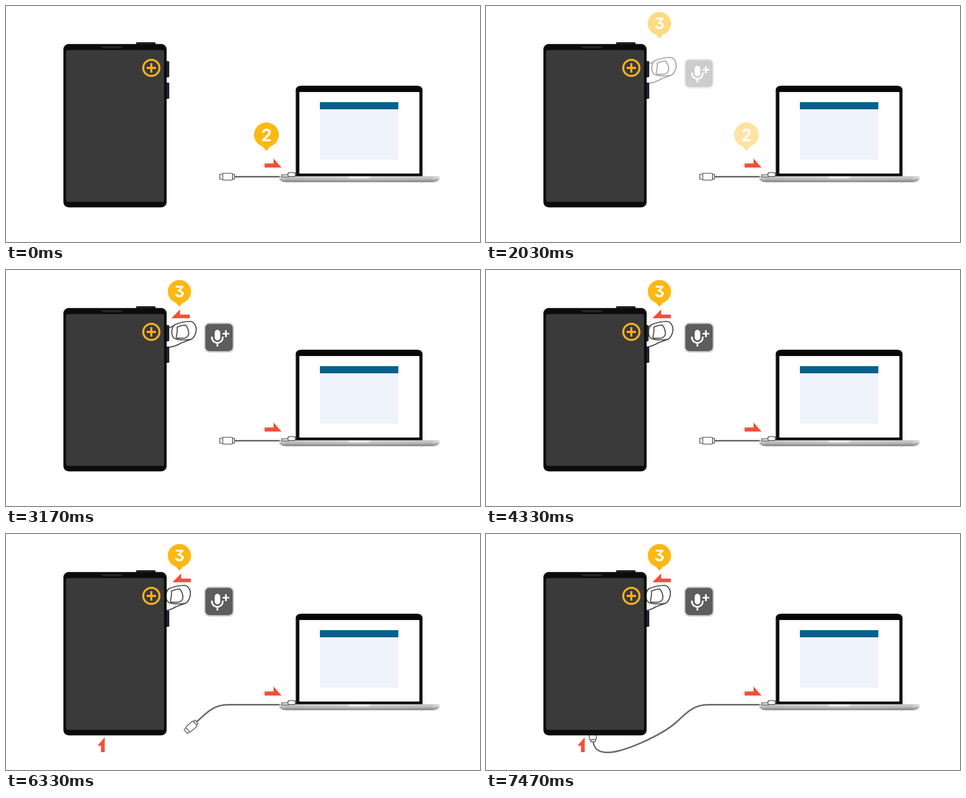
Animation of 900 by 450 pixels, one loop 9100 ms. Source, as an HTML page:

```html
<!DOCTYPE html>
<html lang="en">
<head>
<meta charset="utf-8">
<title>Connect and press</title>
<style>
  html, body { margin: 0; width: 100%; height: 100%; overflow: hidden; background: #fff; }
  svg { display: block; width: 100vw; height: 100vh; filter: blur(.5px); }
  text { font: 700 32px Inter, "Open Sans", sans-serif; font-feature-settings: "cv09"; fill: #fff; text-anchor: middle; }
  .red { fill: #f4503a; }
  .button { fill: #22222d; }
  .line { fill: none; stroke: #505050; stroke-width: 2.1; stroke-linecap: round; stroke-linejoin: round; }
  .plug { fill: #fff; stroke: #686868; stroke-width: 1.7; }
  .gold { fill: none; stroke: #fdb022; stroke-width: 3.8; }
  .mic { fill: none; stroke: #fff; stroke-width: 3.2; }
</style>
</head>
<body>
<svg viewBox="0 0 900 450">
  <defs>
    <linearGradient id="silver">
      <stop offset="0" stop-color="#d2d0d2"/>
      <stop offset=".06" stop-color="#c6c3c6"/>
      <stop offset=".5" stop-color="#d4d1d4"/>
      <stop offset=".94" stop-color="#c6c3c6"/>
      <stop offset="1" stop-color="#dddbdd"/>
    </linearGradient>
    <linearGradient id="shade" x2="0" y2="1">
      <stop offset=".3" stop-color="#555" stop-opacity="0"/>
      <stop offset="1" stop-color="#555" stop-opacity=".6"/>
    </linearGradient>
    <path id="pin" fill="#fdb813" d="M-7 21.5A23.5 23.5 0 1 1 7 21.5L1.5 28.5Q0 30-1.5 28.5Z"/>
    <path id="base" d="M519 324.500H823V331Q819 336 808 336H534Q523 336 519 331Z"/>
  </defs>

  <!-- cable -->
  <path id="cable" fill="none" stroke="#6c6c6c" stroke-width="3"
    d="M524 325.500H422C392 325.500 380 342.500 360 360C333 383.500 262 416.500 231 416.500C213 416.500 204.500 408 203.700 396"/>
  <g id="plug" class="plug">
    <rect x="22" y="-5" width="6" height="10" rx="1"/>
    <rect x="4" y="-6.500" width="18.500" height="13" rx="1.5"/>
    <rect x="0" y="-4.300" width="4" height="8.600"/>
  </g>

  <!-- hand -->
  <g id="hand" class="line">
    <path d="M308 110Q316 109 321 104Q336 98 350 98C358 99 362 108 361 116Q359 128 352 132L333 139Q322 146 308 147.500"/>
    <path d="M321 104C314 109 313 122 318 129C323 134 341 134 352 132"/>
    <path d="M325 109Q333 105 341 105Q347 112 347 122Q345 129 338 130H325Q322 129 324 124Q326 116 325 109Z"/>
  </g>

  <!-- tablet -->
  <g class="button">
    <rect id="key" x="300" y="105" width="10" height="31" rx="2"/>
    <rect x="300" y="146" width="10" height="31" rx="2"/>
    <rect x="247" y="69" width="37" height="9" rx="2"/>
  </g>
  <rect x="109" y="72.500" width="196" height="311.500" rx="10" fill="#0c0c0c"/>
  <rect x="114" y="84" width="186" height="289.500" rx="4" fill="#3a3a3a"/>
  <rect x="182" y="77" width="38.500" height="3.500" rx="1.7" fill="#262633"/>
  <circle class="gold" cx="276" cy="118" r="15.4"/>
  <path class="gold" d="M267 118H285M276 109V127"/>

  <!-- laptop -->
  <path d="M550 325V162Q550 152 560 152H781Q791 152 791 162V325Z" fill="#080808"/>
  <path d="M551 324V163M790 324V163" stroke="#555" stroke-width="1"/>
  <rect x="557" y="164" width="228" height="155.500" fill="#fff"/>
  <rect x="596" y="183.300" width="149" height="109.700" fill="#eff3fc"/>
  <rect x="596" y="183.300" width="149" height="13.700" fill="#03618c"/>
  <use href="#base" fill="url(#silver)"/>
  <use href="#base" fill="url(#shade)"/>
  <path d="M649 325H691Q690 329 686 329H654Q650 329 649 325Z" fill="#e9e9eb"/>
  <g class="plug">
    <rect x="524" y="322" width="12" height="4"/>
    <rect x="535.500" y="317.700" width="13.500" height="7.500" rx="1"/>
  </g>

  <!-- microphone tile -->
  <g id="tile">
    <rect x="376" y="100" width="57" height="57.500" rx="10" fill="#d0d0d0"/>
    <rect x="378.500" y="102.700" width="52" height="52" rx="8" fill="#5d5d5d"/>
    <rect x="396.300" y="114" width="10.400" height="20" rx="5.200" fill="#fff"/>
    <path class="mic" d="M391 127V128.500A10.300 10.300 0 0 0 411.600 128.500V127M401.400 139V146M411 121.500H424M417.500 115V128"/>
  </g>

  <!-- arrows and badges -->
  <path class="red" d="M523 308L508 290.700V300.300H491V308Z"/>
  <path id="arrow3" class="red" d="M316 92L332.500 75.300V85H351V92Z"/>
  <path id="arrow1" class="red" d="M187.500 387.700V416H180.300V403.500H173.700Z"/>
  <g id="badge2" transform="translate(494.500 246.500)"><use href="#pin"/><text y="11">2</text></g>
  <g id="badge3"><g transform="translate(329.300 42) scale(.94)"><use href="#pin"/><text y="10.500">3</text></g></g>
</svg>
<script>
const LOOP = 9100, FREE_CABLE = 90;
const $ = id => document.getElementById(id);
const cable = $('cable'), cableLength = cable.getTotalLength();

const linear = p => p;
const easeOut = p => 1 - (1 - p) ** 2;
const easeInOut = p => p < .5 ? 4 * p ** 3 : 1 - 4 * (1 - p) ** 3;
const ramp = (t, start, end, ease = linear) =>
  ease(Math.min(1, Math.max(0, (t - start) / (end - start))));
const move = (id, x, y) => $(id).setAttribute('transform', `translate(${x} ${y})`);
const fade = (id, alpha) => $(id).setAttribute('opacity', alpha);

function drawCable(t) {
  const progress = .31 * ramp(t, 5940, 6330) + .25 * ramp(t, 6330, 6885) + .44 * ramp(t, 6885, 7470);
  const length = FREE_CABLE + (cableLength - FREE_CABLE) * progress;
  const end = cable.getPointAtLength(length), before = cable.getPointAtLength(length - 2);
  const angle = Math.atan2(end.y - before.y, end.x - before.x) * 180 / Math.PI;
  cable.setAttribute('stroke-dasharray', `${length} ${cableLength + 9}`);
  $('plug').setAttribute('transform', `translate(${end.x} ${end.y}) rotate(${angle})`);
}

function draw(now) {
  const t = now % LOOP;
  fade('badge2', 1 - ramp(t, 1800, 2180));
  fade('badge3', ramp(t, 1800, 2240));
  fade('hand', ramp(t, 1800, 2270));
  fade('tile', ramp(t, 1900, 2330));
  move('badge3', 0, -8.5 * (1 - ramp(t, 1800, 2630, easeInOut)));

  fade('arrow3', ramp(t, 2770, 2930));
  move('arrow3', 15 - 17 * ramp(t, 2770, 3170, easeOut) + 2 * ramp(t, 3200, 3630, easeInOut), 0);

  const press = 11 * ramp(t, 4070, 4830, easeOut);
  move('hand', -press, 0);
  move('key', -Math.max(0, press - 5), 0);

  fade('arrow1', ramp(t, 4900, 5060));
  move('arrow1', 0, 15 * (1 - ramp(t, 4900, 5930, easeOut)));

  drawCable(t);
  requestAnimationFrame(() => draw(performance.now() - start));
}
const start = performance.now();
draw(0);
</script>
</body>
</html>
```
